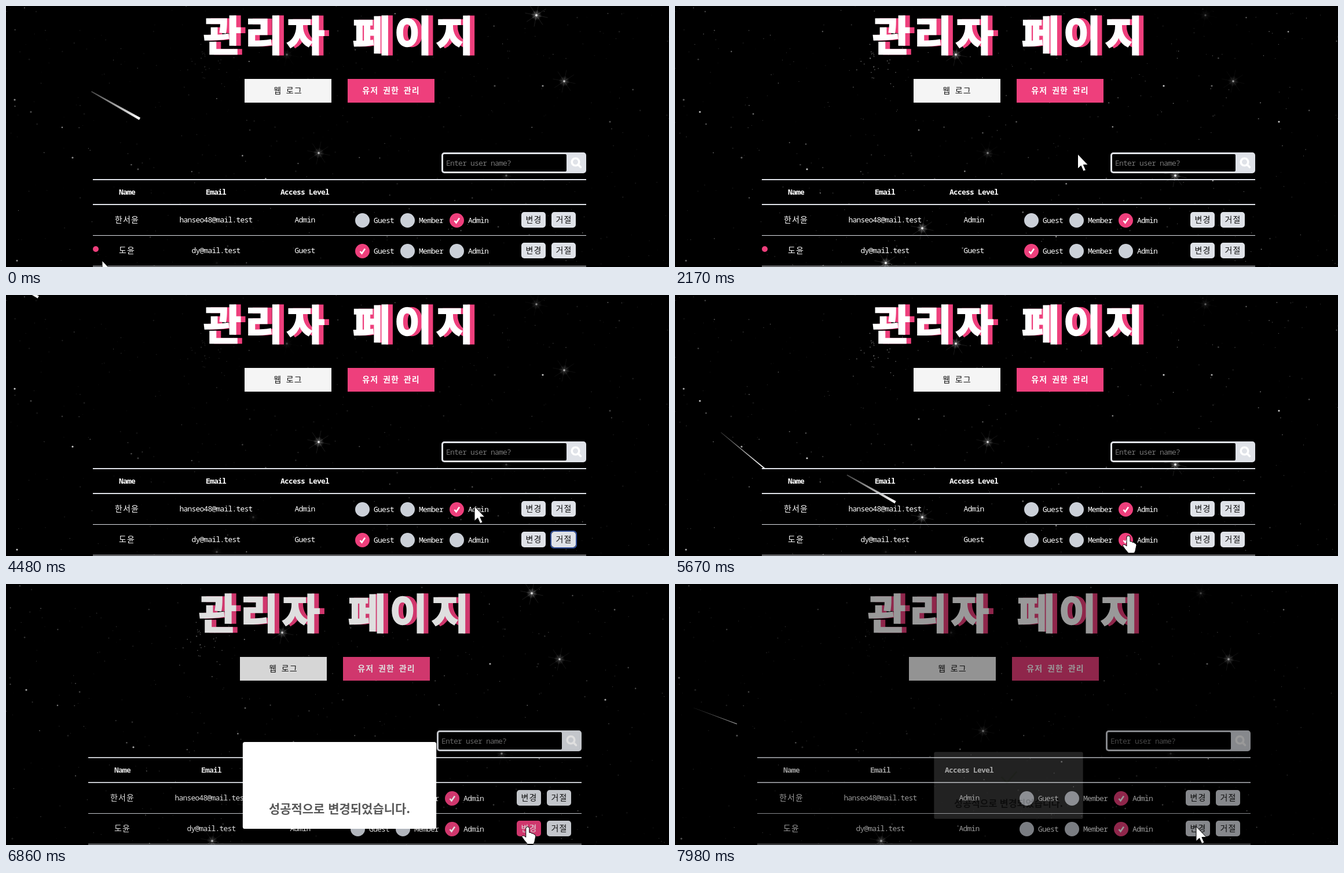
An HTML page with a canvas that plays this animation: 1145x451 px, repeating every 8050 ms.

```html
<!DOCTYPE html>
<html lang="ko">
<head>
<meta charset="utf-8">
<style>
  html, body { margin: 0; width: 100%; height: 100%; overflow: hidden; background: #000; }
  canvas, svg { position: absolute; left: 0; top: 0; width: 1145px; height: 451px; }
  text { fill: #fff; text-anchor: middle; }
  .ko { font: 500 14px "Noto Sans CJK KR", "Noto Sans CJK", sans-serif; letter-spacing: 1.1px; word-spacing: 2.7px; }
  .en { font: 500 13px "Noto Sans Mono", monospace; letter-spacing: -.8px; }
  .bold { font-weight: 700; }
  .thin { font-weight: 400; }
  .dark { fill: #111; }
  .left { text-anchor: start; }
  .title {
    font: 900 71px "Noto Sans CJK KR", "Noto Sans CJK", sans-serif;
    letter-spacing: 6.6px; word-spacing: 15.5px; stroke: #fff; stroke-width: 2.5px;
  }
  .shade { fill: #ee3f7c; stroke: #ee3f7c; }
  .msg { font: 700 28.5px "Noto Sans CJK KR", "Noto Sans CJK", sans-serif; fill: #595959; }
</style>
</head>
<body>
<canvas id="sky" width="1145" height="451"></canvas>
<svg id="view" viewBox="0 0 1145 451"></svg>
<script>
const LOOP = 8050, STEP = 70, SHOW = 6848, HIDE = 7850;
const PINK = '#ee3f7c', PALE = '#dfe2e8', GREY = '#cbd0d8';
const $ = id => document.getElementById(id);
const clamp = v => Math.max(0, Math.min(1, v));
const ease = p => p * p * (3 - 2 * p);

// ---------- page ----------
const text = (x, y, s, cls, extra = '') => `<text x="${x}" y="${y}" class="${cls}" ${extra}>${s}</text>`;
const rect = (x, y, w, h, fill, extra = '') =>
  `<rect x="${x}" y="${y}" width="${w}" height="${h}" fill="${fill}" ${extra}/>`;

const controls = [];
function radio(row, k, x, label) {
  const y = 370.5 + row * 53, id = `radio${row}${k}`;
  controls.push({ x: x - 12.5, y: y - 12.5, w: 25, h: 25 });
  return `<circle id="${id}" cx="${x}" cy="${y}" r="12.5"/>` +
    `<path id="${id}tick" d="M${x - 4} ${y + .5}l3 3.5 5.5-8" fill="none" stroke="#fff" stroke-width="2.6"/>` +
    text(x + 19.5, y + 4.5, label, 'en left');
}
function button(row, k, x, label) {
  const y = 356 + row * 53, id = `btn${row}${k}`;
  controls.push({ id, x, y, w: 42, h: 27 });
  return rect(x, y, 42, 27, PALE, `id="${id}" rx="5"`) +
    text(x + 21.5, y + 18, label, 'ko thin', `id="${id}text"`);
}
const row = (r, name, mail, level) =>
  text(209, 374 + r * 53, name, 'ko') +
  text(362.5, 374 + r * 53, mail, 'en') +
  text(516, 374 + r * 53, level, 'en', `id="level${r}"`) +
  radio(r, 0, 615.5, 'Guest') + radio(r, 1, 693.5, 'Member') + radio(r, 2, 778.5, 'Admin') +
  button(r, 0, 890, '변경') + button(r, 1, 942, '거절') +
  rect(150, 396 + r * 53, 852, 1, PALE);

$('view').innerHTML = `
<g id="page">
  ${text(349, 77, '관리자 페이지', 'title left shade')}
  ${text(341, 77, '관리자 페이지', 'title left')}
  ${rect(412, 126, 150, 41, '#f5f5f5')}${text(487, 150.5, '웹 로그', 'ko thin dark')}
  ${rect(590, 126, 150, 41, PINK)}${text(665, 150.5, '유저 권한 관리', 'ko bold')}
  ${rect(752, 253, 250, 36, PALE, 'rx="5"')}${rect(755, 256, 213, 30, '#000', 'rx="2"')}
  ${text(760, 276, 'Enter user name?', 'en thin left', 'style="fill:#757575"')}
  <g fill="none" stroke="#fff" stroke-width="3.6" stroke-linecap="round">
    <circle cx="983.5" cy="269.5" r="6.3"/><path d="M988.5 274.5l4 4"/>
  </g>
  ${rect(150, 299, 852, 2, PALE)}${rect(150, 342, 852, 2, PALE)}
  ${text(209, 326, 'Name', 'en bold')}${text(362.5, 326, 'Email', 'en bold')}
  ${text(516, 326, 'Access Level', 'en bold')}
  ${row(0, '한서윤', 'hanseo48@mail.test', 'Admin')}
  ${row(1, '도윤', 'dy@mail.test', 'Guest')}
  ${rect(941, 408, 44, 29, 'none', 'id="focus" rx="5" stroke="#3b62c4" stroke-width="1.5"')}
  <circle id="dot" cx="155" cy="420" r="5" fill="${PINK}"/>
</g>
${rect(0, 0, 1145, 451, '#000', 'id="dim"')}
<g id="popup">
  ${rect(-227, -102, 454, 204, '#fff', 'rx="5"')}
  <path id="check" d="M-22-26L-5-8 25-42" pathLength="1" stroke-dasharray="1 2"
    fill="none" stroke="#dcebd3" stroke-width="5"/>
  ${text(0, 65, '성공적으로 변경되었습니다.', 'msg')}
</g>
<g id="cursor" fill="#fff" stroke="#000" stroke-linejoin="round">
  <path id="arrow" d="M0 0V25.5L5.6 20.2 9.8 29.6 14 27.8 9.9 18.6H17.8Z"/>
  <path id="hand" d="M-3 2Q-3-1 0-1Q3-1 3 2V9Q6 8 7 10.5Q10 9.500 11 12Q14 12 14 15.5L12 25Q11 29 9 29H0Q-7 21-10 16Q-8 12-3 17Z"/>
</g>`;

// Stops of the pointer: time, x, y
const stops = [
  [0, 166, 440], [1330, 182, 369], [2300, 722, 250], [3010, 978, 409], [3220, 965, 420],
  [3650, 960, 421], [4050, 562, 265], [4480, 809, 365], [4950, 783, 417], [5850, 783, 417],
  [6350, 901, 421], [LOOP, 900, 419]
];
function pointer(t) {
  const i = stops.findIndex(s => s[0] > t), [t0, x0, y0] = stops[i - 1], [t1, x1, y1] = stops[i];
  const p = ease((t - t0) / (t1 - t0));
  return [x0 + (x1 - x0) * p, y0 + (y1 - y0) * p];
}

const visible = (id, on) => $(id).setAttribute('visibility', on ? 'visible' : 'hidden');
function setRadio(r, chosen) {
  for (let k = 0; k < 3; k++) {
    $(`radio${r}${k}`).setAttribute('fill', k === chosen ? PINK : GREY);
    visible(`radio${r}${k}tick`, k === chosen);
  }
}

function drawPage(t) {
  const open = t >= SHOW, age = t - SHOW, [x, y] = pointer(t);
  const shift = open ? -8 : 0, px = x - shift;
  const over = age < 60 && controls.find(c =>
    px >= c.x && px <= c.x + c.w && y > c.y + 1 && y < c.y + c.h);
  $('page').setAttribute('transform', `translate(${shift})`);
  for (const c of controls) if (c.id) {
    $(c.id).setAttribute('fill', c === over ? PINK : PALE);
    $(c.id + 'text').style.fill = c === over ? '#fff' : '#111';
  }
  setRadio(0, 2);
  setRadio(1, t < 5200 ? 0 : 2);
  $('level1').textContent = open ? 'Admin' : 'Guest';
  visible('dot', t < 3430);
  visible('focus', t >= 3360 && t < 5200);
  visible('arrow', !over);
  visible('hand', over);
  $('cursor').setAttribute('transform', `translate(${x} ${y})`);

  $('dim').setAttribute('opacity', open ? Math.min(.4, age / 95) : 0);
  visible('popup', open);
  if (!open) return;
  const out = clamp((t - HIDE) / 150);
  const grow = 1 - .3 * Math.exp(-age / 110) * Math.cos(age / 60);
  $('popup').setAttribute('transform', `translate(576 348) scale(${grow * (1 - out / 2)})`);
  $('popup').setAttribute('opacity', 1 - out);
  $('check').setAttribute('stroke-dashoffset', 1 - ease(clamp((age - 400) / 350)));
}

// ---------- sky ----------
const ctx = $('sky').getContext('2d');
// Place, period and moment of full light
const sparkles = [
  [916, 16, 3430, 0], [964, 130, 4300, 3400], [540, 254, 4000, 950], [485, 84, 4600, 1600],
  [427, 384, 3900, 2100], [364, 444, 5600, 2400], [864, 293, 3500, 2300]
];
const twinkle = ([, , period, peak], t) => Math.cos(Math.PI * (t - peak) / period) ** 2;

let seed = 11;
const rnd = () => (seed = seed * 16807 % 2147483647) / 2147483647;
const star = (x, y, r, a, group) => ({ x, y, r, a, group });
const stars = Array.from({ length: 480 }, () =>
  star(rnd() * 1145, rnd() * 451, .5 + rnd() ** 4 * .9, .2 + rnd() * .4, Math.floor(rnd() * 7)));
for (let i = 0; i < 30; i++)
  stars.push(star(350 + (rnd() + rnd() - 1) * 55, 100 + (rnd() + rnd() - 1) * 45, .8, .5, 3));
for (const [x, y] of [[15, 162], [115, 262], [19, 440], [927, 138]]) stars.push(star(x, y, 1.6, .9, 2));
for (const [x, y] of [[228, 282], [43, 183], [1043, 200], [844, 138]]) stars.push(star(x, y, 1.6, .9, 3));

function disc(x, y, r, alpha) {
  ctx.globalAlpha = alpha;
  ctx.beginPath();
  ctx.arc(x, y, r, 0, 7);
  ctx.fill();
}

function drawSparkle(x, y, light) {
  const glow = ctx.createRadialGradient(x, y, 0, x, y, 9);
  glow.addColorStop(0, '#fffc');
  glow.addColorStop(.3, '#fff4');
  glow.addColorStop(1, '#fff0');
  ctx.fillStyle = glow;
  disc(x, y, 9, light);
  ctx.fillStyle = '#fff';
  disc(x, y, 1.7, light);
  ctx.lineWidth = .7;
  ctx.globalAlpha = light * .17;
  for (let k = 0; k < 16; k++) {
    const a = (k >> 1) * Math.PI / 4 + .2, len = k % 2 ? 9 : 20;
    ctx.beginPath();
    ctx.moveTo(x, y);
    ctx.lineTo(x + Math.cos(a) * len, y + Math.sin(a) * len);
    ctx.stroke();
  }
}

// Each one passes x, y at the given moment and returns after its period;
// it drifts 18 degrees steeper than its tail is tilted
const meteors = [
  { x: 231, y: 195, at: 0, period: 5122, tilt: 29.5, speed: 404, len: 96, w: 4.5 },
  { x: 232, y: 335, at: 1330, period: 7186, tilt: 20.5, speed: 279, len: 80, w: 1.2 },
  { x: 155, y: 300, at: 5670, period: 7000, tilt: 39.6, speed: 283, len: 98, w: 2 }
];
const LEAD = 1500, DEG = Math.PI / 180;
function drawMeteor(m, t) {
  const wait = (t - m.at + LEAD + m.period) % m.period - LEAD;
  const go = m.speed * wait / 1000, a = (m.tilt + 18) * DEG;
  ctx.save();
  ctx.translate(m.x + go * Math.cos(a), m.y + go * Math.sin(a));
  ctx.rotate(m.tilt * DEG);
  const fade = ctx.createLinearGradient(-m.len, 0, 0, 0);
  fade.addColorStop(0, '#fff4');
  fade.addColorStop(1, '#fff');
  ctx.fillStyle = fade;
  ctx.globalAlpha = 1;
  ctx.beginPath();
  ctx.moveTo(-m.len, -m.w / 5);
  ctx.lineTo(0, -m.w / 2);
  ctx.lineTo(0, m.w / 2);
  ctx.lineTo(-m.len, m.w / 5);
  ctx.fill();
  ctx.restore();
}

function drawSky(t) {
  ctx.setTransform(1, 0, 0, 1, 0, 0);
  ctx.globalAlpha = 1;
  ctx.fillStyle = '#000';
  ctx.fillRect(0, 0, 1145, 451);
  ctx.translate(t >= SHOW ? -8 : 0, 0);
  ctx.fillStyle = ctx.strokeStyle = '#fff';
  const light = sparkles.map(s => twinkle(s, t));
  for (const s of stars) disc(s.x, s.y, s.r, s.a * (.15 + .85 * light[s.group]));
  sparkles.forEach(([x, y], i) => drawSparkle(x, y, light[i]));
  for (const m of meteors) drawMeteor(m, t);
}

const start = performance.now();
function frame() {
  const t = Math.floor((performance.now() - start) % LOOP / STEP) * STEP;
  drawSky(t);
  drawPage(t);
  requestAnimationFrame(frame);
}
frame();
</script>
</body>
</html>
```
